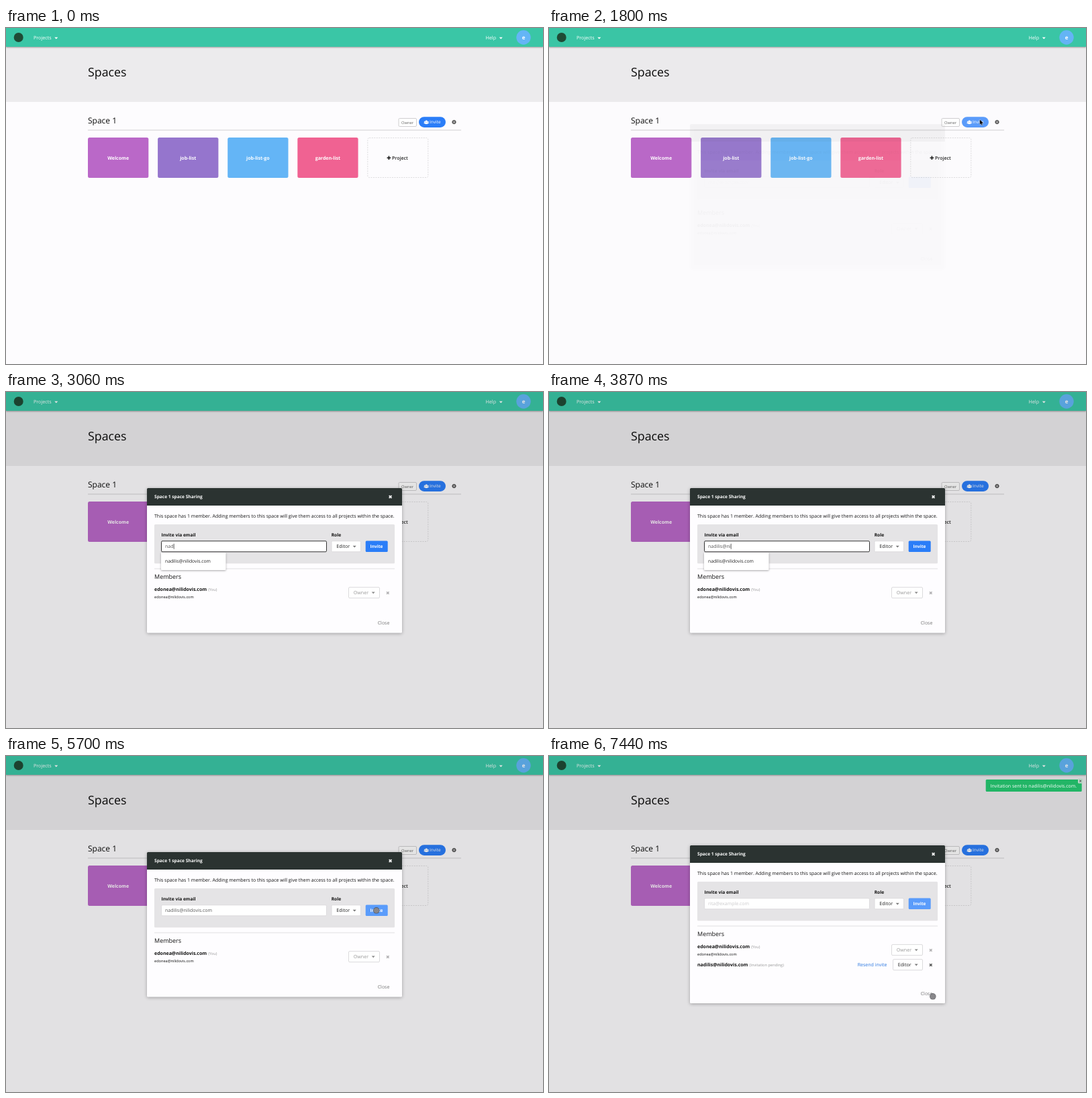
An HTML page with a canvas that plays this animation: 800 by 500 pixels, repeating every 7.47 s.

```html
<!DOCTYPE html>
<html lang="en">
<head>
<meta charset="utf-8">
<title>Space sharing</title>
<style>
html, body { margin: 0; width: 100%; height: 100%; overflow: hidden; background: #fdfcfe; }
canvas { display: block; }
</style>
</head>
<body>
<canvas id="stage" width="800" height="500"></canvas>
<script>
const c = document.getElementById('stage').getContext('2d');
c.textRendering = 'geometricPrecision';

const LOOP = 7470;
const OWNER = 'edonea@nilidovis.com';
const GUEST = 'nadilis@nilidovis.com';
const BLUE = '#2a7df8', LIGHT_BLUE = '#5a9cfb', INK = '#111';
const CARDS = [['Welcome', '#ba68c8'], ['job-list', '#9575cd'],
               ['job-list-go', '#64b5f6'], ['garden-list', '#f06292']];

// Moments of the story, in ms
const ENTER = 630, OPEN = 1770, FOCUS = 2520, TYPE = 2720, FILL = 4260,
      RETURN = 5010, SEND = 5640, SENT = 5760;

const clamp = v => Math.min(1, Math.max(0, v));
const ease = v => (v = clamp(v), v * v * (3 - 2 * v));

function text(s, x, y, size, color, weight = 400, align = 'left') {
  c.font = `${weight} ${size}px "Open Sans", "Noto Sans", sans-serif`;
  c.fillStyle = color;
  c.textAlign = align;
  c.fillText(s, x, y);
}

function box(x, y, w, h, fill, r = 0, stroke, dash = []) {
  c.beginPath();
  c.roundRect(x, y, w, h, r);
  if (fill) { c.fillStyle = fill; c.fill(); }
  if (stroke) {
    c.strokeStyle = stroke;
    c.lineWidth = 1;
    c.setLineDash(dash);
    c.stroke();
    c.setLineDash([]);
  }
}

function disc(x, y, r, fill) {
  c.beginPath();
  c.arc(x, y, r, 0, 7);
  c.fillStyle = fill;
  c.fill();
}

function poly(points, fill) {
  c.beginPath();
  points.forEach(([x, y]) => c.lineTo(x, y));
  c.closePath();
  c.fillStyle = fill;
  c.fill();
}

const caret = (x, y, color) => poly([[x, y], [x + 5, y], [x + 2.5, y + 2.6]], color);

function cross(x, y, r, color, width = 1.6) {
  c.beginPath();
  c.moveTo(x - r, y - r); c.lineTo(x + r, y + r);
  c.moveTo(x + r, y - r); c.lineTo(x - r, y + r);
  c.strokeStyle = color;
  c.lineWidth = width;
  c.stroke();
}

function shadow(blur, alpha, y = 1) {
  c.shadowColor = `rgba(0,0,0,${alpha})`;
  c.shadowBlur = blur;
  c.shadowOffsetY = y;
}
const noShadow = () => shadow(0, 0, 0);

function people(x, y) {
  for (const [dx, dy, r] of [[-2.4, -.6, 1], [2.4, -.6, 1], [0, -1.3, 1.5]]) {
    disc(x + dx, y + dy, r, '#fff');
    box(x + dx - r * 1.35, y + dy + r, r * 2.7, r * 1.9, '#fff', 1);
  }
}

function gear(x, y) {
  c.save();
  c.translate(x, y);
  for (let i = 0; i < 4; i++) {
    box(-.8, -3.2, 1.6, 6.4, '#555');
    c.rotate(Math.PI / 4);
  }
  c.restore();
  disc(x, y, 2.4, '#555');
  disc(x, y, 1, '#fdfcfe');
}

function page(t) {
  box(0, 0, 800, 500, '#fdfcfe');
  box(0, 28, 800, 82, '#ecebed');
  shadow(2, .35);
  box(0, 0, 800, 28, '#3ac6a6');
  noShadow();

  disc(18.7, 14, 7, '#1f4a35');
  text('Projects', 41, 17, 7.2, '#fff');
  caret(72.3, 13.8, '#fff');
  text('Help', 714.5, 17, 7.2, '#fff');
  caret(734.8, 13.8, '#fff');
  disc(771, 14, 10.7, '#64b5f6');
  text('e', 771, 17, 8, '#fff', 700, 'center');

  text('Spaces', 122, 72, 17.8, '#0c0c0c', 500);
  text('Space 1', 122, 142, 12, '#0c0c0c', 500);
  box(122, 151.6, 556, 1, '#d2d1d3');

  box(585, 134.5, 26.5, 12, '#fff', 1.5, '#d0cfd1');
  text('Owner', 598, 142.8, 5.8, '#666', 400, 'center');
  box(615, 132.3, 40, 15.6, t > OPEN - 30 && t < 2460 ? LIGHT_BLUE : BLUE, 7.8);
  people(626.2, 140);
  text('Invite', 631, 142.4, 6.5, '#fff', 500);
  gear(667.5, 140);

  CARDS.forEach(([name, color], i) => {
    const x = 122 + i * 104.1;
    box(x, 163, 90.3, 60, color, 2.5);
    text(name, x + 45.1, 195.7, 7, '#fff', 700, 'center');
  });
  box(538.8, 163.5, 90, 59, null, 2.5, '#dddcde', [2, 1.5]);
  box(567.6, 192.4, 5.6, 1.7, '#222');
  box(569.55, 190.45, 1.7, 5.6, '#222');
  text('Project', 575, 195.7, 7, '#222', 600);
}

function select(label, x, y, w, on = true) {
  box(x, y, w, 16, '#fff', 1.5, '#dcdbdd');
  const color = on ? '#222' : '#999';
  text(label, x + 7.3, y + 10.6, 7.1, color);
  caret(x + w - 11.8, y + 7, on ? '#777' : '#888');
}

function field(t) {
  const focused = t >= FOCUS && t < SEND;
  box(231.5, 221.8, 246, 16, '#fff', 1.5, focused ? '#333' : '#dcdbdd');
  const count = t >= SENT || t < TYPE ? 0
    : t >= FILL ? GUEST.length
    : Math.min(10, 1 + Math.floor((t - TYPE) / 118));
  const typed = GUEST.slice(0, count);
  if (count) text(typed, 237, 232.2, 7, '#555');
  else text('rita@example.com', 237, 232.2, 7, '#cbcacc');

  if (focused && t < FILL) {
    c.font = '400 7px "Open Sans", "Noto Sans", sans-serif';
    box(237.3 + c.measureText(typed).width, 225.8, .7, 8, '#222');
  }
}

function suggestion() {
  shadow(3, .35);
  box(231, 239, 96.5, 26, '#fff', 1);
  noShadow();
  text(GUEST, 237, 254.2, 6.8, '#222');
}

function member(y, email, note, role, on) {
  text(email, 221, y, 7, INK, 700);
  const w = c.measureText(email).width;
  text(note, 221 + w + 2, y, 5.7, '#999');
}

function modal(t) {
  const sent = t >= SENT;
  c.save();
  c.globalAlpha = ease((t - OPEN) / 270);
  c.translate(0, sent ? -10 : 0);

  shadow(5, .3);
  box(210, 143, 380, sent ? 235 : 215.5, '#fefdff', 1.5);
  noShadow();
  box(210, 143, 380, 26, '#2b3331', [1.5, 1.5, 0, 0]);
  text('Space 1 space Sharing', 221, 157.8, 6.6, '#fff', 700);
  cross(572.6, 156, 1.9, '#fff');

  text('This space has 1 member. Adding members to this space will give them access to all projects within the space.',
    221, 187.2, 7, INK);
  box(221, 197, 358, 58.3, '#e5e4e6', 1.5);
  text('Invite via email', 231.5, 215.2, 6.65, INK, 700);
  text('Role', 484.7, 215.2, 6.65, INK, 700);
  field(t);
  select('Editor', 485, 221.8, 43.5);
  box(535.7, 221.6, 33, 16.4, t >= SEND ? LIGHT_BLUE : BLUE, 1.5);
  text('Invite', 552, 232.3, 6.6, '#fff', 700, 'center');

  box(221, 262.5, 358, 1, '#e1e0e2');
  text('Members', 221, 278, 9, INK, 500);
  member(296.2, OWNER, '(You)');
  text(OWNER, 221, 306.5, 5.6, INK);
  select('Owner', 510.5, 290.6, 46, false);
  cross(568.8, 299, 1.8, '#b0afb1', 1.5);

  if (sent) {
    member(323.2, GUEST, '(Invitation pending)');
    text('Resend invite', 459.7, 323.2, 7, '#2a77e0');
    select('Editor', 512.5, 312.6, 44);
    cross(568.8, 321, 1.8, '#555', 1.5);
  }
  text('Close', 553.7, sent ? 365.8 : 346.2, 7, '#777');
  if (t >= TYPE && t < FILL) suggestion();
  c.restore();
}

function toast(t) {
  c.save();
  c.globalAlpha = ease((t - SENT) / 180);
  box(650.7, 35, 143, 18, '#22b566', 1.5);
  text('Invitation sent to ' + GUEST + '.', 657.5, 46.6, 7, '#fff');
  box(788, 33.5, 7.3, 7.3, '#b9d6c6', 1.5);
  cross(791.6, 37.2, 1.4, '#444', 1);
  c.restore();
}

function glide(t, start, end, [x0, y0], [x1, y1]) {
  const k = ease((t - start) / (end - start));
  return [x0 + (x1 - x0) * k, y0 + (y1 - y0) * k];
}

function pointer(t) {
  if (t >= ENTER && t < TYPE) {
    const [x, y] = t < OPEN
      ? glide(t, ENTER, 1600, [470, 196], [641.7, 136])
      : glide(t, 1830, 2310, [641.7, 136], [269.5, 226]);
    const arrow = [[0, 0], [0, 8], [1.8, 6.4], [3, 9], [4.3, 8.4], [3.2, 5.9], [5.6, 5.8]]
      .map(([dx, dy]) => [x + dx, y + dy]);
    poly(arrow, '#000');
    c.strokeStyle = 'rgba(255,255,255,.8)';
    c.lineWidth = .5;
    c.stroke();
  } else if (t >= RETURN) {
    const [x, y] = t < SENT
      ? glide(t, RETURN, 5550, [300, 240], [551.8, 229.8])
      : glide(t, 6240, 7260, [551.8, 229.8], [571.8, 357.8]);
    disc(x, y, 4.8, 'rgba(70,70,75,.75)');
    disc(x, y, 3.9, '#88878b');
  }
}

function draw(now) {
  const t = Math.max(0, now - began) % LOOP;
  page(t);
  if (t >= OPEN) {
    box(0, 0, 800, 500, `rgba(0,0,0,${.105 * ease((t - OPEN) / 240)})`);
    modal(t);
  }
  if (t >= SENT) toast(t);
  pointer(t);
  requestAnimationFrame(draw);
}

const began = performance.now();
draw(began);
</script>
</body>
</html>
```
